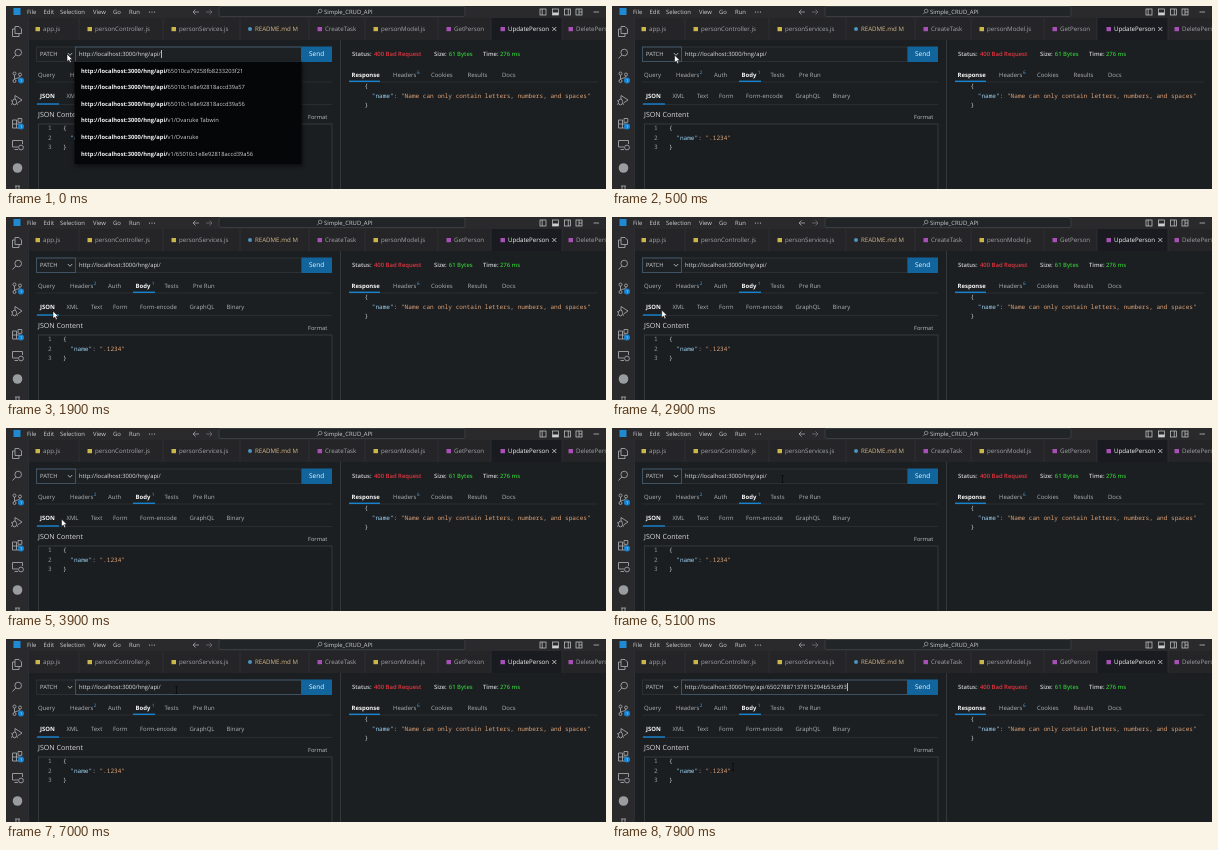
An HTML page for the animation above (8000 ms loop, 600 px wide and 183 px high).

```html
<!DOCTYPE html>
<html lang="en">
<head>
<meta charset="utf-8">
<title>API client in an editor</title>
<style>
  html, body { margin: 0; width: 100%; height: 100%; overflow: hidden; background: #1c1f22; }
  svg { display: block; width: 600px; height: 183px; }
  text { font-family: "Open Sans", "Noto Sans", sans-serif; text-rendering: geometricPrecision; white-space: pre; }
  .mono { font-family: "Noto Sans Mono", "DejaVu Sans Mono", monospace; }
</style>
</head>
<body>
<svg id="stage" viewBox="0 0 600 183" xmlns="http://www.w3.org/2000/svg"></svg>
<script>
const NS = 'http://www.w3.org/2000/svg';
const stage = document.getElementById('stage');
const LOOP = 8000, STEP = 100;
const URL_BASE = 'http://localhost:3000/hng/api/';
const C = {
  panel: '#1c1f22', title: '#2a2a2d', bar: '#252528', line: '#303438', text: '#cccecf', dim: '#a2a4a7',
  white: '#f5f5f5', blue: '#1784d2', focus: '#42586a', key: '#9cd3f3', str: '#dca176',
  red: '#e6353f', green: '#31c235', js: '#cbb64a', tc: '#a84fb8'
};

function add(tag, attrs, parent = stage) {
  const el = document.createElementNS(NS, tag);
  for (const k in attrs) el.setAttribute(k, attrs[k]);
  parent.appendChild(el);
  return el;
}
const rect = (x, y, width, height, fill, more = {}, parent) =>
  add('rect', { x, y, width, height, fill, ...more }, parent);
const path = (d, stroke = C.dim, w = 0.9, more = {}, parent) =>
  add('path', { d, stroke, 'stroke-width': w, fill: 'none', ...more }, parent);
const dot = (cx, cy, r, fill) => add('circle', { cx, cy, r, fill });

// text placed by its left edge and vertical middle
function label(x, cy, str, size = 5.95, fill = C.text, weight = 400, parent) {
  const el = add('text', { x, y: cy + size * 0.35, 'font-size': size, fill, 'font-weight': weight }, parent);
  el.textContent = str;
  return el;
}
function code(x, cy, parts) {
  const el = label(x, cy, '', 6.08);
  el.setAttribute('class', 'mono');
  for (const [str, fill] of parts) add('tspan', { fill }, el).textContent = str;
}
const show = (el, on) => el.setAttribute('visibility', on ? 'visible' : 'hidden');

// ---- title bar ----
rect(0, 0, 600, 183, C.panel);
rect(0, 0, 600, 12, C.title);
rect(7.5, 2, 7, 7, '#1f8ad2');
[['File', 21], ['Edit', 37.5], ['Selection', 54], ['View', 87], ['Go', 107], ['Run', 123]]
  .forEach(([s, x]) => label(x, 5.6, s, 5.9));
[143.5, 146, 148.5].forEach(x => dot(x, 6, 0.6, C.text));
path('M193 6H187M189.5 3.5L187 6L189.5 8.5', C.dim, 0.8);
path('M200 6H206M203.5 3.5L206 6L203.5 8.5', '#707275', 0.8);
rect(213, 0.5, 246, 10, '#222528', { rx: 2, stroke: '#44474a', 'stroke-width': 0.7 });
path('M316 5A1.8 1.8 0 1 1 312.4 5A1.8 1.8 0 1 1 316 5M312.8 6.4L311.1 8.3', C.dim, 0.7);
label(318, 5.6, 'Simple_CRUD_API', 5.9);
[534, 546.5, 558.5, 570].forEach((x, i) => {
  rect(x, 3, 6, 6, 'none', { stroke: C.text, 'stroke-width': 0.7 });
  if (i === 0) path(`M${x + 2.2} 3V9`, C.text, 0.7);
  if (i === 1) rect(x, 6.5, 6, 2.5, C.text);
  if (i === 2) path(`M${x + 3.8} 3V9`, C.text, 0.7);
  if (i === 3) path(`M${x + 3} 3V9M${x + 3} 6H${x + 6}`, C.text, 0.7);
});
path('M587.5 6H593', C.text, 0.7);

// ---- activity bar ----
rect(0, 12, 22, 171, C.title);
path('M22.5 12V183', C.line, 0.8);
path('M9 20.5H13L15.5 23V27.5H9ZM9 23H6.5V30.5H13V27.5');
path('M15.5 46.5A3.3 3.3 0 1 1 8.9 46.5A3.3 3.3 0 1 1 15.5 46.5M9.8 49L6.5 52.5');
[[8.5, 67.5], [8.5, 75], [14, 68.5]].forEach(([cx, cy]) =>
  add('circle', { cx, cy, r: 1.5, fill: 'none', stroke: C.dim, 'stroke-width': 0.9 }));
path('M8.5 69V73.5M14 70C14 73 9 71.5 8.5 73.5');
path('M9 93V89.5L16 94L11.5 97');
path('M6.5 95.5A2 2.4 0 1 1 10.5 95.5V96.5A2 2.4 0 1 1 6.5 96.5ZM5 94.5L6.5 95.5M5 98.5L6.5 97.5M12 98.5L10.5 97.5');
path('M6.5 114H10.5V122H6.5ZM6.5 118H14.5V122H10.5M12 112.5H15.8V116.3H12Z');
for (const [cy, n] of [[74.5, '1'], [120.5, '1']]) {
  dot(15, cy, 3, C.blue);
  label(13.9, cy, n, 4, C.white);
}
path('M12 141H6.5V134.5H16.5V138M8.5 143.5H12');
add('circle', { cx: 15, cy: 141.5, r: 2.4, fill: 'none', stroke: C.dim, 'stroke-width': 0.9 });
dot(11.5, 162, 4.8, '#9a9da0');
path('M9 180H14M10 180V183M13 180V183');

// ---- editor tabs ----
rect(23, 12, 577, 22, C.bar);
rect(485, 12, 71, 22, '#1a1b20');
[73, 157, 234, 303, 359, 432, 485, 556].forEach(x => path(`M${x} 12V34`, C.line, 0.7));
[
  ['app.js', 37, C.js], ['personController.js', 89, C.js], ['personServices.js', 173, C.js],
  ['README.md', 249, '#4c94bd'], ['CreateTask', 319, C.tc], ['personModel.js', 375, C.js],
  ['GetPerson', 448, C.tc], ['UpdatePerson', 502, C.tc], ['DeletePerson', 570, C.tc]
].forEach(([name, x, icon]) => {
  const ink = name === 'UpdatePerson' ? C.white : name === 'README.md' ? '#d6b98a' : C.dim;
  if (name === 'README.md') dot(x - 5, 23, 2, icon);
  else rect(x - 7.5, 21, 4.5, 4.2, icon);
  label(x, 22.8, name, 6.15, ink);
});
label(286.5, 22.8, 'M', 6, '#d6b98a');
path('M546.3 21L550.3 25M550.3 21L546.3 25', C.white, 0.7);

// ---- request panel ----
path('M334.5 34V183', '#34383b', 1);
rect(30.5, 41, 39, 14.5, '#1e2124', { stroke: '#303437', 'stroke-width': 0.8 });
rect(69.5, 41, 226, 14.5, '#1e2124', { stroke: '#303437', 'stroke-width': 0.8 });
label(34, 48.2, 'PATCH', 5.8);
path('M61.8 47L64 49.3L66.2 47', C.text, 0.8);
const url = label(73, 48, URL_BASE, 5.85, '#dcdedf');
const methodRing = rect(30.5, 41, 39, 14.5, 'none', { stroke: C.focus, 'stroke-width': 0.9 });
const urlRing = rect(69.5, 41, 226, 14.5, 'none', { stroke: C.focus, 'stroke-width': 0.9 });
const caret = rect(0, 44, 0.7, 8, C.white);
rect(295.5, 40.5, 30.5, 15.5, '#11659c');
label(303, 48.2, 'Send', 6.5, C.white);

function tabRow(cy, items, active) {
  for (const [s, x, count] of items) {
    const on = s === active;
    label(x, cy, s, 5.95, on ? C.white : '#aeb1b4', on ? 700 : 400);
    if (count) label(count[1], cy - 1.8, count[0], 4.6, '#4aa8ea');
  }
}
path('M30 76H326M343 76H592M30 98.5H326', C.line, 0.7);
tabRow(68.5, [['Query', 32], ['Headers', 64, ['2', 87.8]], ['Auth', 102], ['Body', 129.5, ['1', 145.7]],
  ['Tests', 158.5], ['Pre Run', 187]], 'Body');
rect(127, 74.6, 22, 1.4, C.blue);
tabRow(90, [['JSON', 34], ['XML', 60.5], ['Text', 85], ['Form', 107], ['Form-encode', 134],
  ['GraphQL', 183.5], ['Binary', 220.5]], 'JSON');
rect(31, 97.3, 22, 1.4, C.blue);
label(32, 109, 'JSON Content', 7.1, '#d6d8da');
label(302, 111, 'Format', 5.7, '#bbbec0');
rect(32.5, 118, 293.5, 70, '#1b1e21', { stroke: '#3c4043', 'stroke-width': 0.8 });
['1', '2', '3'].forEach((n, i) => code(42, 122.3 + i * 9.3, [[n, '#8d979c']]));

function json(x, cy, value) {
  code(x, cy, [['{', C.text]]);
  code(x + 7.26, cy + 9.3, [['"name"', C.key], [': ', C.text], [`"${value}"`, C.str]]);
  code(x, cy + 18.6, [['}', C.text]]);
}
json(57, 122.3, '.1234');

// ---- response panel ----
[
  ['Status:', 346, C.text], ['400 Bad Request', 368, C.red], ['Size:', 428, C.text],
  ['61 Bytes', 442.8, C.green], ['Time:', 477, C.text], ['276 ms', 494, C.green]
].forEach(([s, x, ink]) => label(x, 48.3, s, 5.9, ink, 600));
tabRow(68.5, [['Response', 345.5], ['Headers', 387, ['6', 411]], ['Cookies', 425], ['Results', 461.5],
  ['Docs', 496]], 'Response');
rect(343, 74.6, 31, 1.4, C.blue);
json(358.5, 80.3, 'Name can only contain letters, numbers, and spaces');

// ---- address suggestions ----
const menu = add('g', {});
rect(68.5, 55.5, 227, 102.5, '#050608', { style: 'filter: drop-shadow(1px 2px 2px rgba(0,0,0,.6))' }, menu);
[
  '65010ca79258fb8233203f21', '65010c1e8e92818accd39a57', '65010c1e8e92818accd39a56',
  'v1/Ovaruke Tabwin', 'v1/Ovaruke', 'v1/65010c1e8e92818accd39a56'
].forEach((tail, i) => {
  const row = label(75, 64.8 + i * 16.55, '', 5.75, C.text, 400, menu);
  add('tspan', { 'font-weight': 700, fill: C.white }, row).textContent = URL_BASE;
  add('tspan', {}, row).textContent = tail;
});

// ---- pointer ----
const arrow = add('path', {
  d: 'M0 0V7.6L1.8 6L3 8.7L4.3 8.1L3.1 5.5H5.5Z', fill: '#fff', stroke: '#000', 'stroke-width': 0.5
});
const beam = path('M-1.3 -3.5H1.3M0 -3.5V3.5M-1.3 3.5H1.3', '#060708', 0.7);

const MOVES = [
  [0, 61, 48], [100, 61, 48], [500, 62.5, 49], [900, 62.5, 49], [1500, 47, 94], [2600, 47, 94],
  [3400, 55.5, 91], [4000, 55.5, 91], [4900, 170.5, 51], [7500, 170.5, 51], [7900, 121, 128], [8000, 121, 128]
];
const MENU_END = 200, FOCUS = 5200, PASTE = 7500;

function pointerAt(t) {
  const i = MOVES.findIndex(m => m[0] > t);
  const [t0, x0, y0] = MOVES[i - 1], [t1, x1, y1] = MOVES[i];
  const u = (t - t0) / (t1 - t0), e = u * u * (3 - 2 * u);
  return [x0 + (x1 - x0) * e, y0 + (y1 - y0) * e];
}

function draw(t) {
  const typing = t < MENU_END || t >= FOCUS;
  const start = t < MENU_END ? 0 : t < PASTE ? FOCUS : PASTE;
  show(menu, t < MENU_END);
  show(urlRing, typing);
  show(methodRing, !typing);
  url.textContent = URL_BASE + (t >= PASTE ? '65027887137815294b53cd93' : '');
  show(caret, typing && (t - start) % 1000 < 500);
  caret.setAttribute('x', 73.4 + url.getComputedTextLength());

  const [x, y] = pointerAt(t);
  const overText = (x > 70 && y > 41 && y < 55) || (x > 33 && y > 118);
  for (const el of [arrow, beam]) el.setAttribute('transform', `translate(${x} ${y})`);
  show(arrow, !overText);
  show(beam, overText);
}

function tick() {
  const t = performance.now() % LOOP;
  draw(Math.floor(t / STEP) * STEP);
  requestAnimationFrame(tick);
}
tick();
</script>
</body>
</html>
```
